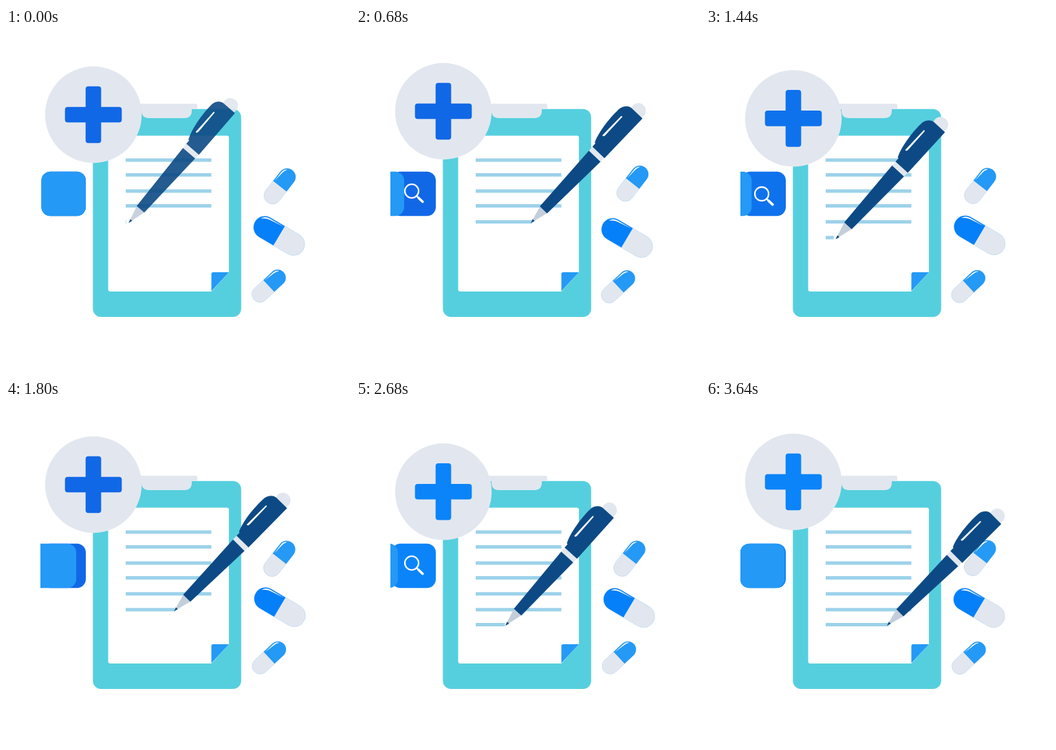
An HTML page that plays this animation: 500x500 px, repeating every 3.68 s.

```html
<!DOCTYPE html>
<html lang="en">
<head>
<meta charset="utf-8">
<title>Medical form</title>
<style>
  html, body { margin: 0; height: 100%; overflow: hidden; background: #fff; }
  svg { display: block; width: 100vw; height: 100vh; }
</style>
</head>
<body>
<svg viewBox="0 0 500 500">
  <clipPath id="stage"><rect x="50" y="40" width="400" height="420"/></clipPath>
  <g clip-path="url(#stage)">
    <rect x="126.3" y="117.7" width="215.5" height="302.3" rx="12" fill="#55cfde"/>
    <path d="M151.5 156.5H321Q324 156.5 324 159.5V355L298.5 383H151.5Q148.5 383 148.5 380V159.5Q148.5 156.5 151.5 156.5Z" fill="#fff"/>
    <path d="M301 355H324L298.5 382.5V357.5Q298.5 355 301 355Z" fill="#2499f6"/>
    <path d="M180 110H275Q278 110 278 113V117.7H270V120Q270 131 259 131H208Q197 131 197 120V117.7H180Z" fill="#e2e7ef"/>
    <g id="lines" stroke="#9cd2ea" stroke-width="5"></g>

    <g id="badge">
      <circle r="70.2" fill="#e2e7ef"/>
      <g class="accent">
        <rect x="-41.3" y="-11.3" width="82.6" height="22.6" rx="4"/>
        <rect x="-11.3" y="-41.3" width="22.6" height="82.6" rx="4"/>
      </g>
    </g>

    <rect class="accent" x="51.5" y="208.7" width="64.5" height="64.5" rx="13"/>
    <g id="lens" stroke="#fff" fill="none" stroke-linecap="round">
      <circle r="10" stroke-width="2.2"/>
      <path d="M7.3 7.3L10 10" stroke-width="2.2"/>
      <path d="M10 10L15.8 15.5" stroke-width="3.6"/>
    </g>
    <rect id="cover" x="51.5" y="208.7" width="64.5" height="64.5" rx="13" fill="#2499f6"/>

    <g id="pills"></g>

    <g id="pen">
      <circle cy="-226" r="11" fill="#e2e7ef"/>
      <path d="M0 0L-7.3 -27H7.3Z" fill="#c3cedb"/>
      <path d="M0 0L-2 -6H2Z" fill="#0d4a85"/>
      <path d="M-7.3 -26.5H7.3L11.7 -134.5H-11.7Z" fill="#0d4a85"/>
      <path d="M-11.7 -134.5H11.7L12 -142H-12Z" fill="#e2e7ef"/>
      <path d="M-12 -142H12.3V-222H-9.5C-14 -222 -20 -218 -21.5 -210C-23 -194 -21 -165 -13.5 -148.5H-12Z" fill="#0d4a85"/>
      <path d="M-13 -164Q-9.5 -163 -10 -169L-10.5 -203Q-11.5 -205 -12.5 -203Z" fill="#fff"/>
    </g>
  </g>
</svg>
<script>
const LOOP = 3680;
const $ = s => document.querySelector(s);

// Smooth curve through [time, value] keys, level at turning points.
function track(...keys) {
  const rate = i => (keys[i + 1][1] - keys[i][1]) / (keys[i + 1][0] - keys[i][0]);
  const last = keys.length - 1;
  const slopes = keys.map((_, i) => {
    if (i === 0) return rate(0);
    if (i === last) return rate(last - 1);
    const a = rate(i - 1), b = rate(i);
    return a * b <= 0 ? 0 : 2 * a * b / (a + b);
  });
  return t => {
    if (t >= keys[last][0]) return keys[last][1];
    let i = 0;
    while (t >= keys[i + 1][0]) i++;
    const [t0, v0] = keys[i], [t1, v1] = keys[i + 1];
    const d = t1 - t0, u = (t - t0) / d, w = 1 - u;
    return v0 * (1 + 2 * u) * w * w + v1 * u * u * (3 - 2 * u)
      + d * u * w * (slopes[i] * w - slopes[i + 1] * u);
  };
}

const penX = track([0, 178], [680, 254], [930, 298], [1160, 215], [1260, 177], [1800, 244],
  [2080, 298], [2240, 214], [2340, 177], [2680, 217], [3060, 263], [LOOP, 263]);
const penY = track([0, 283.5], [930, 283.5], [1160, 305], [1260, 307], [2080, 307],
  [2240, 321], [2340, 328], [LOOP, 328]);
const penTilt = track([0, 40.9], [680, 43.7], [930, 46], [1160, 43.2], [1260, 42], [1800, 44.5],
  [2080, 46], [2240, 42.5], [2340, 41], [2680, 42], [3060, 45.2], [LOOP, 45.2]);
const badgeY = track([0, 126], [520, 119], [680, 121], [1160, 132.3], [1260, 133.3], [1800, 123],
  [2010, 119], [2240, 124.5], [2680, 133.3], [2750, 133.6], [3360, 120.3], [3600, 119], [LOOP, 119]);
const coverX = track([0, 0], [680, -46], [1000, -65], [1160, -65], [1800, -14], [1980, 0],
  [2240, -24], [2680, -55], [2880, -66], [3000, -66], [3640, -2], [LOOP, 0]);
const lensY = track([0, 237], [680, 237], [1160, 244], [1800, 237], [LOOP, 237]);
const glow = track([0, 0], [760, 0], [1050, 1], [1200, 1], [1600, 0], [2300, 0], [2600, 1], [LOOP, 1]);

const pills = [
  { x: 398, y: 230, r: 12.4, half: 17.2, turn: 'rotate(-52)', color: '#2499f6',
    drift: track([0, 0], [680, 4], [1160, 2], [1800, -.6], [2680, -.5], [LOOP, .4]) },
  { x: 397, y: 302, r: 16.3, half: 24.2, turn: 'rotate(30.5) scale(-1 1)', color: '#0580f8',
    drift: track([0, 0], [680, -3], [1160, .2], [1800, 1], [2240, -1], [2680, 0], [LOOP, 0]) },
  { x: 382, y: 375, r: 11.7, half: 17.6, turn: 'rotate(-43)', color: '#2499f6',
    drift: track([0, 0], [680, -1], [1160, -1.4], [1800, .4], [2240, -1], [2680, .4], [LOOP, 0]) }
];
$('#pills').innerHTML = pills.map(({ r, half, turn, color }) => `<g><g transform="${turn}">
  <rect x="${-half - r}" y="${-r}" width="${2 * (half + r)}" height="${2 * r}" rx="${r}"
    fill="#e2e7ef" stroke="#a9cff3" stroke-width=".5"/>
  <path d="M0 ${-r}H${half}A${r} ${r} 0 0 1 ${half} ${r}H0Z" fill="${color}"/>
  <path d="M1 ${1.6 - r}H${half}Q${half + r * .5} ${1.8 - r} ${half + r * .7} ${-r * .5}
    Q${half + r * .3} ${3.4 - r} ${half} ${3.2 - r}Z" fill="#fff"/></g></g>`).join('');

const rows = [192, 213.5, 237, 258.5, 281.8, 304.7, 326.5];
$('#lines').innerHTML = rows.map(y => `<path d="M174 ${y}H298.5"/>`).join('');
const lines = [...$('#lines').children];
const spans = [[0, 930], [1260, 2080], [2340, LOOP]];
const accents = document.querySelectorAll('.accent');
const move = (el, x, y, more = '') => el.setAttribute('transform', `translate(${x} ${y}) ${more}`);

function draw(t) {
  const x = penX(t);
  move($('#pen'), x, penY(t), `rotate(${penTilt(t)})`);
  $('#pen').setAttribute('opacity', Math.min(1, .9 + t / 400));

  spans.forEach(([start, end], i) => {
    const tip = t < start ? 174 : t >= end ? 298.5 : 174 + (x - 177.5) * 1.07;
    const reach = Math.max(174, Math.min(298.5, tip));
    lines[i + 4].setAttribute('d', `M174 ${rows[i + 4]}H${reach}`);
  });

  move($('#badge'), 127, badgeY(t));
  move($('#lens'), 81, lensY(t));
  move($('#cover'), coverX(t), 0);
  const g = glow(t);
  const color = `rgb(${17 - 6 * g},${104 + 28 * g},${230 + 19 * g})`;
  accents.forEach(el => el.setAttribute('fill', color));

  pills.forEach((p, i) => {
    const d = p.drift(t);
    move($('#pills').children[i], p.x + d, p.y - d);
  });
}

const begin = performance.now();
function tick() {
  draw((performance.now() - begin) % LOOP);
  requestAnimationFrame(tick);
}
tick();
</script>
</body>
</html>
```
